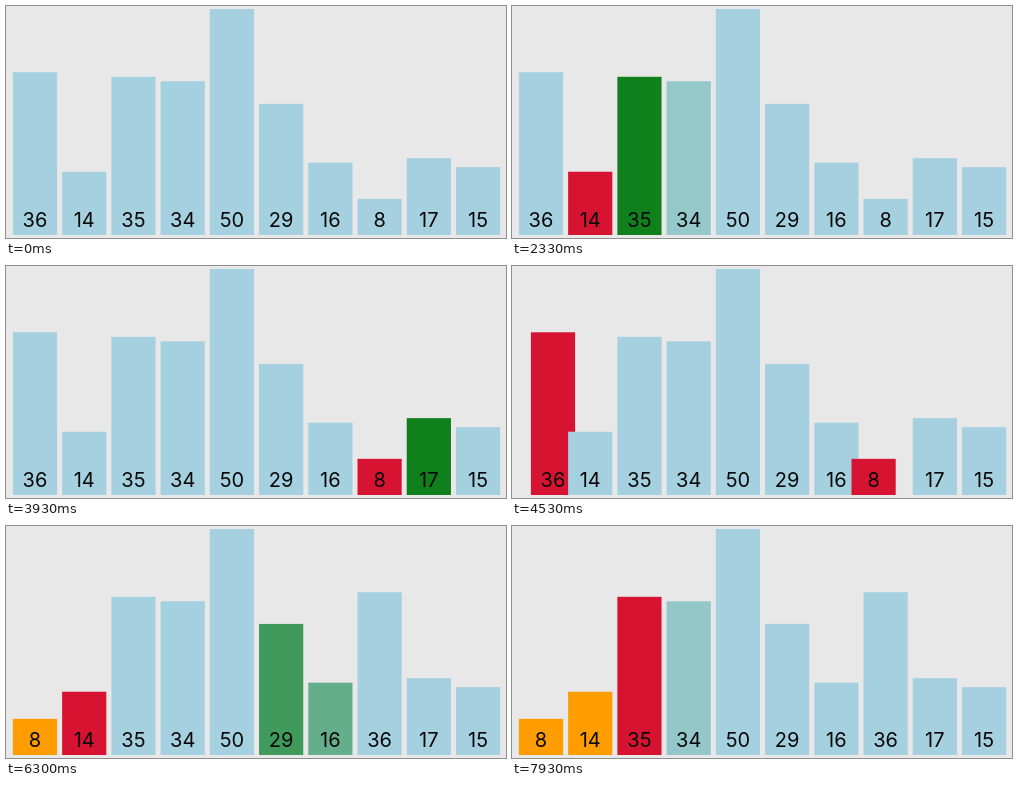
An HTML page for the animation above (8 s loop, 500x232 px).

```html
<!DOCTYPE html>
<html lang="en">
<head>
<meta charset="utf-8">
<title>Selection sort</title>
<style>
  html, body { margin: 0; width: 100%; height: 100%; overflow: hidden; background: #e8e8e8; }
  svg { display: block; width: 500px; height: 232px; }
  text { font: 20px Inter, "Liberation Sans", sans-serif; text-anchor: middle; fill: #080808; }
</style>
</head>
<body>
<svg id="stage" viewBox="0 0 500 232"></svg>
<script>
const LOOP = 8000, STEP = 250;
const BLUE = [165, 208, 223], RED = [214, 20, 50], GREEN = [0, 120, 8], ORANGE = [255, 157, 0];
const LEFT = 6.9, PITCH = 49.23, WIDTH = 44.2, FLOOR = 229, UNIT = 4.52;
const values = [36, 14, 35, 34, 50, 29, 16, 8, 17, 15];

const stage = document.getElementById('stage');
const add = (parent, tag, attrs) => {
  const node = document.createElementNS('http://www.w3.org/2000/svg', tag);
  for (const key in attrs) node.setAttribute(key, attrs[key]);
  return parent.appendChild(node);
};

const bars = new Map(values.map((value, slot) => {
  const group = add(stage, 'g', {});
  const height = value * UNIT;
  const rect = add(group, 'rect', { y: FLOOR - height, width: WIDTH, height });
  add(group, 'text', { x: WIDTH / 2, y: 221 }).textContent = value;
  return [value, { group, rect, paints: [], moves: [], slot }];
}));

// Timeline
const paint = (time, value, to) => bars.get(value).paints.push({ time, to });
const move = (time, value, slot) => bars.get(value).moves.push({ time, to: [slot] });
const scan = (time, list) => list.forEach((value, i) => {
  paint(time + i * STEP, value, GREEN);
  paint(time + (i + 1) * STEP, value, BLUE);
});

// First pass: 8 is the smallest
paint(1440, 36, RED);
paint(1652, 14, GREEN);
paint(1863, 14, RED);
paint(1863, 36, BLUE);
scan(2075, [35, 34, 50, 29, 16]);
paint(3325, 8, GREEN);
paint(3575, 8, RED);
paint(3575, 14, BLUE);
scan(3787, [17, 15]);
paint(4287, 36, RED);
move(4537, 36, 7);
move(4537, 8, 0);
paint(4770, 8, ORANGE);
paint(4770, 36, BLUE);

// Second pass: 14 stays in place
paint(5005, 14, RED);
scan(5240, [35, 34, 50, 29, 16, 36, 17, 15]);
paint(7470, 14, ORANGE);

// Third pass begins
paint(7697, 35, RED);
paint(7924, 34, GREEN);

// cubic-bezier(.25, .1, .25, 1)
const bezier = (s, a, b) => 3 * (1 - s) ** 2 * s * a + 3 * (1 - s) * s * s * b + s ** 3;
function ease(x) {
  if (x <= 0 || x >= 1) return x <= 0 ? 0 : 1;
  let low = 0, high = 1;
  for (let i = 0; i < 20; i++) {
    const mid = (low + high) / 2;
    if (bezier(mid, .25, .25) < x) low = mid; else high = mid;
  }
  return bezier(low, .1, 1);
}

// Each transition starts from wherever the previous one had got to.
function valueAt(time, start, events) {
  let from = start, last = null;
  const at = t => last
    ? from.map((v, i) => v + (last.to[i] - v) * ease((t - last.time) / STEP))
    : from;
  for (const event of events) {
    if (event.time > time) break;
    from = at(event.time);
    last = event;
  }
  return at(time);
}

// The motion runs at 20 pictures a second on a 30 Hz grid.
const sampleTime = ms => 50 * Math.round(Math.floor((ms + 5) * .03) * 2 / 3);

function draw(now) {
  const time = sampleTime(now % LOOP);
  for (const { group, rect, paints, moves, slot } of bars.values()) {
    const [place] = valueAt(time, [slot], moves);
    group.setAttribute('transform', `translate(${LEFT + place * PITCH} 0)`);
    rect.setAttribute('fill', `rgb(${valueAt(time, BLUE, paints).map(Math.round)})`);
  }
}

let origin = null;
function tick(now) {
  origin ??= now;
  draw(now - origin);
  requestAnimationFrame(tick);
}
draw(0);
requestAnimationFrame(tick);
</script>
</body>
</html>
```
